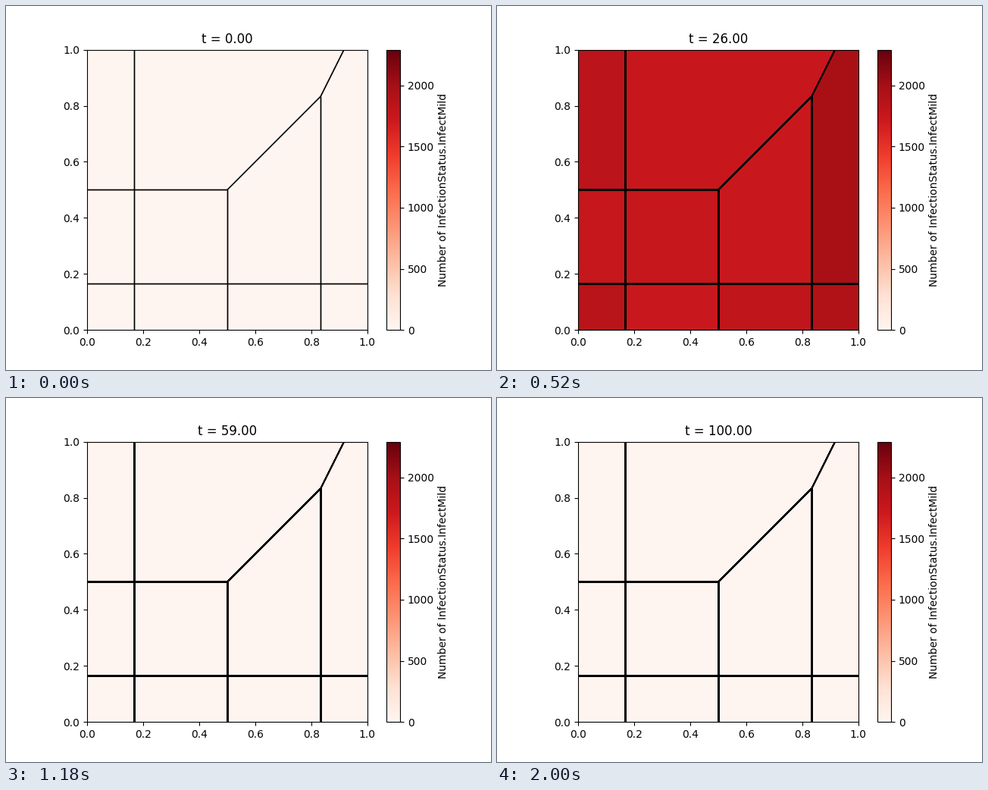
Animation, 640 px wide and 480 px high, one loop 2.02 s. Source, as a matplotlib script:

```python
import numpy as np
import matplotlib.pyplot as plt
from matplotlib.animation import FuncAnimation
from matplotlib.collections import LineCollection, PolyCollection

DAYS = 101
VMAX = 2292
A, H, B = 1 / 6, 1 / 2, 5 / 6   # cell borders
TOP = B + (1 - B) / 2           # where the steep border leaves the box


def box(x0, y0, x1, y1):
    return [(x0, y0), (x1, y0), (x1, y1), (x0, y1)]


# outline, peak count, day of the peak
CELLS = [
    (box(0, 0, A, A), 2100, 23.1),
    (box(A, 0, H, A), 2170, 22.05),
    (box(H, 0, B, A), 2115, 22.7),
    (box(B, 0, 1, A), 2075, 23.7),
    (box(0, A, A, H), 2140, 22.3),
    (box(A, A, H, H), 2160, 22.2),
    ([(H, A), (B, A), (B, B), (H, H)], 2155, 22.1),
    ([(B, A), (1, A), (1, 1), (TOP, 1), (B, B)], 2090, 24.0),
    (box(0, H, A, 1), 2130, 22.85),
    ([(A, H), (H, H), (B, B), (TOP, 1), (A, 1)], 2115, 22.4),
]
BORDERS = [
    [(A, 0), (A, 1)],
    [(0, A), (1, A)],
    [(0, H), (H, H)],
    [(H, 0), (H, H)],
    [(B, 0), (B, B)],
    [(H, H), (B, B)],
    [(B, B), (TOP + 0.05, 1.1)],
]
shapes, peaks, peak_days = zip(*CELLS)
peaks, peak_days = np.array(peaks), np.array(peak_days)


def infected(day):
    """Epidemic wave: quick rise, slower decay."""
    lag = day - peak_days
    width = np.where(lag < 0, 5.28, 8.2)
    return peaks / np.cosh(lag / width) ** 2


fig, ax = plt.subplots(figsize=(6.4, 4.8), dpi=100)
ax.set_aspect("equal")
ax.set_xlim(0, 1)
ax.set_ylim(0, 1)

cells = PolyCollection(shapes, cmap="Reds", linewidths=0,
                       antialiaseds=False, zorder=1)
cells.set_clim(0, VMAX)
cells.set_array(infected(0))
ax.add_collection(cells)
borders = LineCollection(BORDERS, colors="k", linewidths=1.0, zorder=2)
ax.add_collection(borders)
fig.colorbar(cells, ax=ax, label="Number of InfectionStatus.InfectMild")
title = ax.set_title("t = 0.00")


def update(day):
    cells.set_array(infected(day))
    # borders are redrawn every day, so their soft edges build up
    borders.set_segments(BORDERS * (day + 2))
    title.set_text(f"t = {day:.2f}")
    return cells, borders, title


anim = FuncAnimation(fig, update, frames=DAYS, interval=20,
                     repeat=True, repeat_delay=0, blit=False)
plt.show()
```
